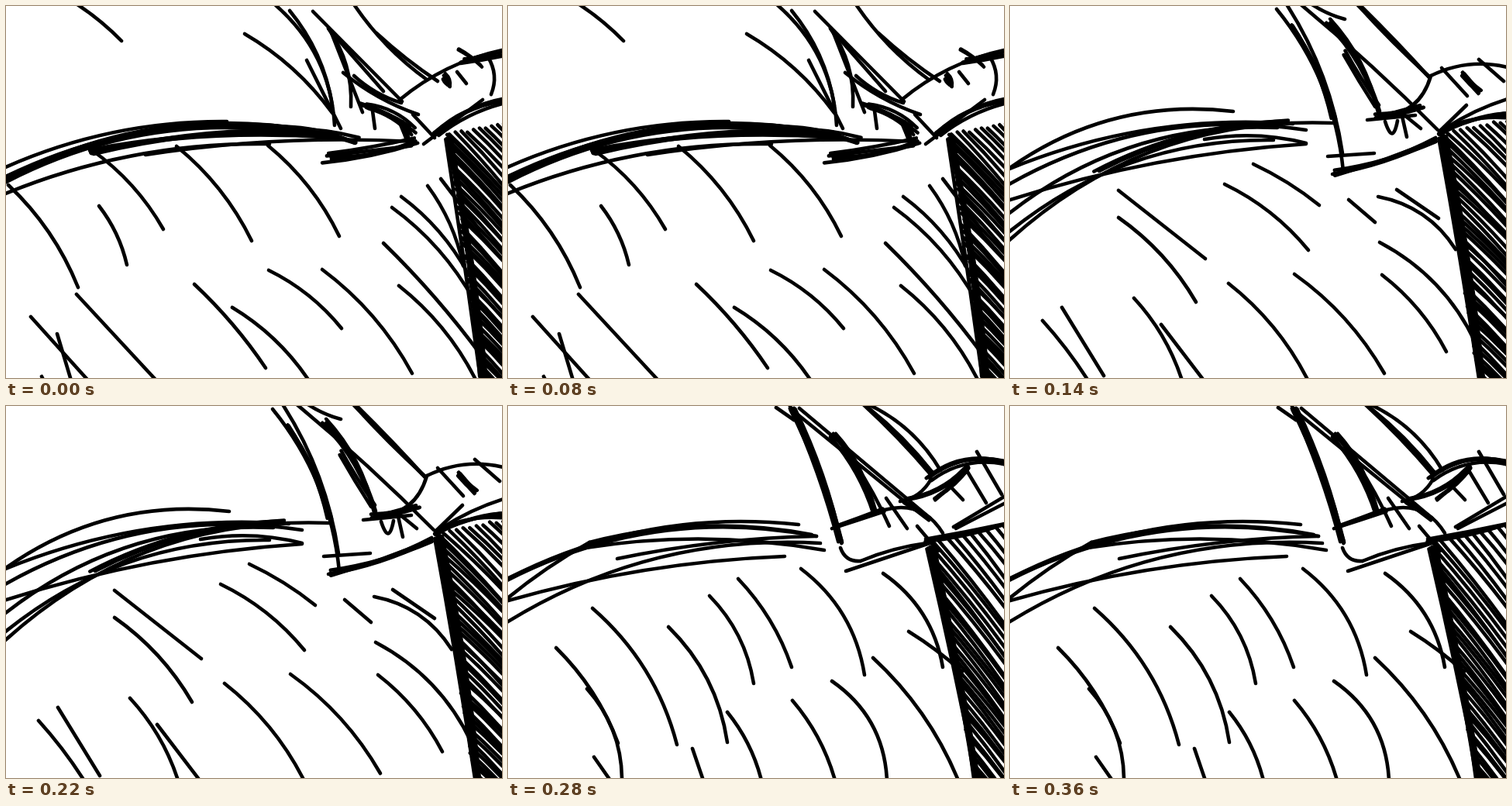
Recreate the animation shown at these times as an HTML page with a canvas. Size 640 by 480 pixels, loop 420 ms.

```html
<!DOCTYPE html>
<html lang="en">
<head>
<meta charset="utf-8">
<title>Ink sketch</title>
<style>
html, body { margin: 0; width: 100%; height: 100%; overflow: hidden; background: #fff; }
canvas { display: block; }
</style>
</head>
<body>
<canvas id="stage" width="640" height="480"></canvas>
<script>
const ctx = document.getElementById('stage').getContext('2d');
const HOLD = 140;
let seed = 1;

// Seeded random number around zero, as wide as size.
function wobble(size) {
  seed = (seed * 16807) % 2147483647;
  return (seed / 2147483647 - 0.5) * size;
}

// A pen stroke that bows out sideways by the given distance.
function line(x, y, u, v, bow = 0) {
  const k = 2 * bow / Math.hypot(u - x, v - y);
  ctx.beginPath();
  ctx.moveTo(x, y);
  ctx.quadraticCurveTo((x + u) / 2 + (v - y) * k, (y + v) / 2 - (u - x) * k, u, v);
  ctx.stroke();
}

const hair = (x, y, u, v) => line(x, y, u, v, Math.hypot(u - x, v - y) * 0.055);

// Several loose strokes over the same path.
function bundle(n, loose, x, y, u, v, bow = 0) {
  while (n--) {
    line(x + wobble(loose), y + wobble(loose), u + wobble(loose), v + wobble(loose), bow + wobble(loose / 2));
  }
}

// Shading under the top edge and beside the slanted left edge.
function hatch(step, slope, x, y, foot) {
  const shade = (sx, sy) => {
    const run = 655 - sx;
    line(sx, sy, 655, sy + run * (slope + wobble(0.14)), run * 0.02);
  };
  for (let sx = 650; sx > x; sx -= step) shade(sx, y - (sx - x) * 0.2 + wobble(4));
  for (let sy = y; sy < 490; sy += step) shade(x + (foot - x) * (sy - y) / (480 - y) + wobble(5), sy);
  bundle(7, 10, x, y + 6, foot, 482, 3);
}

function first() {
  // back
  line(-3, 209, 285, 149, 16);
  bundle(5, 12, -3, 222, 400, 164, 33);
  bundle(6, 10, 110, 188, 420, 167, 12);
  line(-3, 243, 340, 178, 18);
  line(180, 192, 527, 175, 9);
  bundle(4, 10, 350, 154, 452, 172, 5);
  bundle(5, 14, 415, 196, 525, 177, -3);
  // neck and ear
  line(92, -2, 149, 45, 2);
  line(308, 36, 421, 138, 8);
  line(348, -1, 424, 154, 18);
  line(366, 6, 421, 128, 9);
  line(388, 70, 432, 158);
  line(396, 7, 511, 123);
  line(416, 29, 445, 130, 9);
  line(416, 29, 487, 110);
  line(420, 35, 460, 137);
  line(449, -2, 543, 95, -6);
  line(478, 35, 557, 97, -2);
  line(435, 86, 532, 140, -5);
  line(449, 90, 510, 125, -4);
  bundle(5, 12, 463, 130, 526, 160, 5);
  bundle(3, 8, 508, 150, 522, 178);
  line(472, 128, 476, 158);
  line(525, 140, 553, 170);
  // muzzle
  line(508, 121, 640, 57, 9);
  bundle(3, 7, 590, 71, 642, 62);
  bundle(3, 10, 564, 90, 577, 103);
  line(582, 85, 594, 100);
  bundle(2, 7, 587, 58, 614, 79);
  line(622, 66, 626, 114, 6);
  bundle(5, 10, 557, 163, 642, 123, 7);
  line(539, 178, 615, 121);
  // flank
  hair(3, 231, 93, 363);
  hair(111, 186, 203, 288);
  hair(120, 258, 156, 334);
  hair(220, 181, 317, 303);
  hair(338, 180, 430, 297);
  line(32, 401, 105, 482);
  line(66, 423, 84, 483);
  line(46, 478, 49, 484);
  line(91, 372, 192, 481);
  line(243, 359, 335, 467, 4);
  hair(292, 389, 390, 482);
  hair(339, 341, 433, 416);
  hair(408, 340, 524, 474);
  line(487, 306, 614, 452, 4);
  hair(507, 361, 606, 482);
  hair(498, 260, 604, 380);
  hair(510, 246, 596, 345);
  hair(544, 232, 590, 335);
  line(561, 223, 612, 290);
  hatch(7.8, 1.08, 571, 166, 616);
}

function second() {
  // back
  line(-3, 211, 288, 136, 29);
  line(-3, 211, 365, 152, 22);
  line(-3, 231, 382, 160, 34);
  line(-3, 251, 382, 178, 12);
  line(-3, 269, 345, 157, 34);
  line(-3, 293, 340, 173, 33);
  line(-3, 304, 418, 151, 46);
  line(251, 172, 382, 177, 7);
  bundle(3, 8, 112, 214, 355, 151, 15);
  // neck and ear
  line(344, 4, 430, 213, 17);
  line(357, -2, 429, 190, 11);
  bundle(3, 7, 365, 28, 418, 145, 6);
  line(374, -3, 552, 160, 3);
  line(388, -3, 432, 17, -2);
  bundle(4, 8, 411, 20, 474, 138, 9);
  bundle(2, 7, 432, 60, 473, 128);
  bundle(3, 7, 451, -3, 543, 90);
  line(543, 90, 477, 143, 15);
  bundle(3, 9, 475, 142, 531, 132);
  line(461, 147, 523, 141);
  line(484, 149, 500, 148, -16);
  line(505, 138, 512, 169);
  line(508, 140, 530, 158);
  bundle(4, 10, 419, 214, 545, 171, -3);
  line(410, 194, 470, 190);
  // muzzle
  line(543, 90, 642, 79, 9);
  line(557, 80, 590, 116);
  bundle(4, 7, 584, 88, 605, 110);
  line(605, 69, 637, 97);
  line(554, 162, 589, 128);
  line(563, 157, 642, 120, 3);
  bundle(4, 9, 556, 163, 642, 141, 4);
  // flank
  line(140, 238, 252, 326);
  hair(140, 273, 240, 382);
  hair(277, 230, 385, 315);
  line(314, 204, 399, 257, 3);
  line(437, 250, 471, 279);
  line(499, 237, 553, 274);
  line(475, 246, 575, 314, 13);
  line(477, 305, 601, 435, 15);
  hair(480, 347, 563, 446);
  line(42, 406, 100, 482, 2);
  line(67, 389, 121, 477);
  hair(160, 377, 222, 483);
  line(195, 411, 250, 483);
  hair(282, 358, 384, 482);
  hair(367, 346, 483, 474);
  hatch(8.6, 1.02, 558, 164, 606);
}

function third() {
  // back
  line(-3, 224, 375, 153, 29);
  line(-3, 226, 398, 168, 35);
  line(-3, 250, 105, 176, 3);
  line(105, 176, 392, 166, 16);
  line(-3, 252, 357, 194, 11);
  line(-3, 280, 403, 177, 33);
  line(141, 197, 398, 168, 6);
  line(100, 183, 408, 186, 13);
  // neck and ear
  line(346, 2, 369, 18);
  bundle(5, 7, 367, 2, 428, 174, 5);
  line(376, 3, 545, 145);
  line(364, 3, 520, 130);
  bundle(4, 8, 419, 39, 473, 137, 6);
  line(447, 73, 492, 155, 2);
  bundle(3, 9, 454, -3, 549, 86, 4);
  line(463, -3, 558, 83, 10);
  bundle(3, 6, 419, 157, 486, 134);
  line(486, 134, 561, 164, 15);
  line(429, 183, 455, 200, -6);
  line(455, 200, 540, 177, 3);
  line(436, 213, 547, 176);
  line(488, 119, 515, 158);
  bundle(2, 6, 511, 122, 541, 145);
  line(506, 123, 546, 94, -6);
  bundle(2, 5, 512, 121, 590, 82, -7);
  // muzzle
  bundle(4, 7, 543, 94, 642, 75, 12);
  bundle(5, 9, 553, 118, 592, 82, -3);
  line(568, 101, 587, 121);
  line(590, 80, 617, 125);
  line(605, 59, 637, 114);
  line(575, 156, 642, 116);
  line(578, 158, 642, 125);
  bundle(3, 7, 542, 174, 642, 150, -2);
  line(528, 155, 555, 187);
  // flank
  hair(62, 312, 142, 435);
  line(102, 365, 147, 483, 12);
  line(111, 453, 132, 483);
  line(109, 261, 218, 437, 16);
  line(207, 285, 283, 434, 14);
  line(238, 442, 252, 483);
  line(260, 245, 317, 358, 10);
  hair(297, 223, 366, 337);
  hair(283, 395, 327, 483);
  hair(367, 380, 422, 483);
  line(378, 210, 460, 347, 16);
  line(418, 355, 489, 483, 18);
  hair(471, 325, 581, 483);
  line(484, 216, 561, 337, 15);
  line(517, 291, 586, 343, 2);
  hatch(10.6, 1.28, 545, 174, 605);
}

const poses = [first, second, third];
let shown = -1;

function draw(now) {
  const i = Math.floor(now / HOLD) % poses.length;
  if (i === shown) return;
  shown = i;
  seed = 4711 + i * 97;
  ctx.fillStyle = '#fff';
  ctx.fillRect(0, 0, 640, 480);
  ctx.strokeStyle = '#000';
  ctx.lineWidth = 4.6;
  ctx.lineCap = 'round';
  poses[i]();
}

const start = performance.now();
function tick() {
  draw(performance.now() - start);
  requestAnimationFrame(tick);
}
tick();
</script>
</body>
</html>
```
